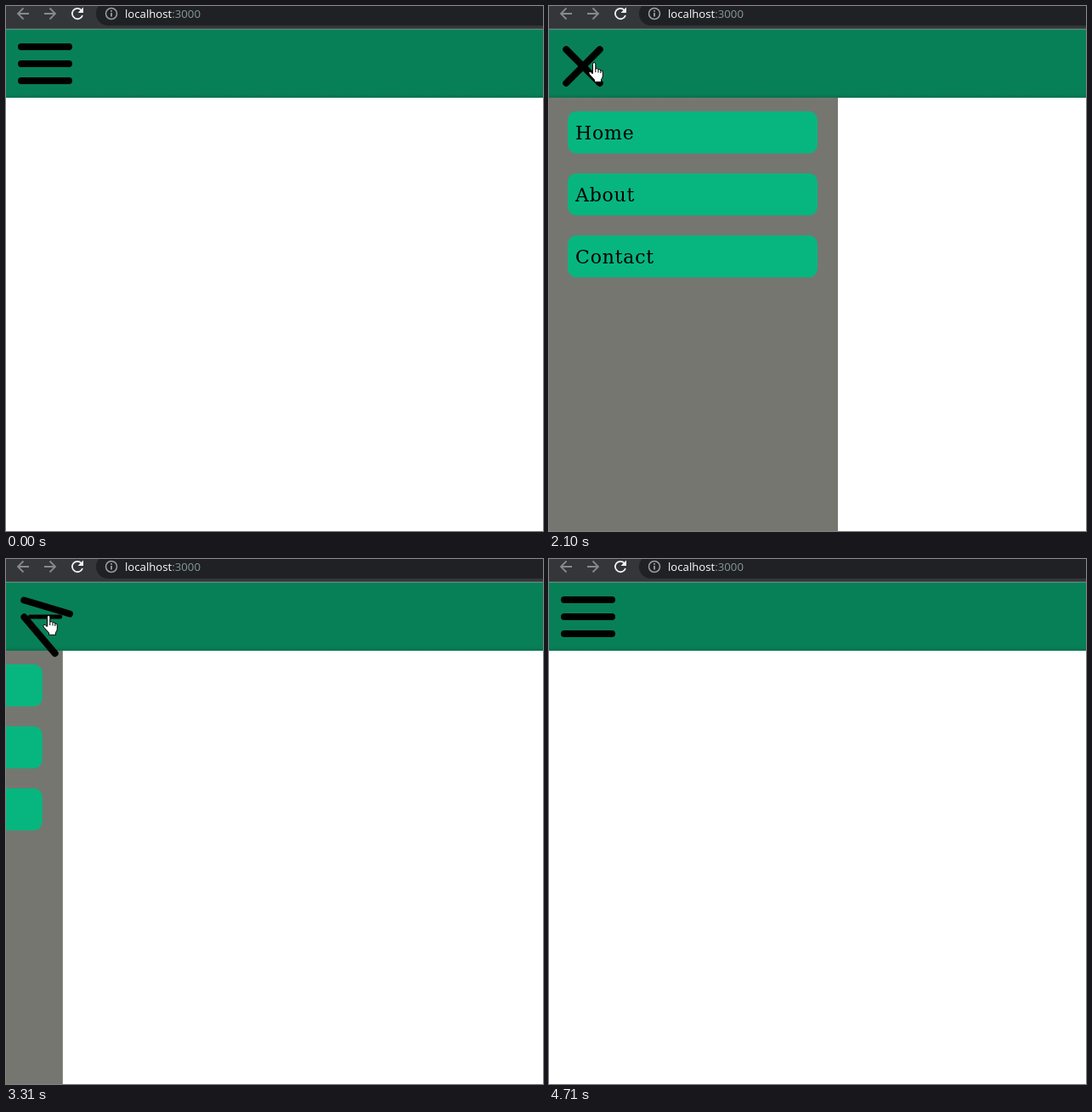
An HTML page for the animation above (6.03 s loop, 632 by 618 pixels).

```html
<!DOCTYPE html>
<html lang="en">
<head>
<meta charset="utf-8">
<title>Sliding menu</title>
<style>
  html, body { margin: 0; width: 100%; height: 100%; overflow: hidden; background: #fff; }
  svg { display: block; }
  .url { font: 13.2px "Open Sans", "Noto Sans", sans-serif; fill: #fff; }
  .link { font: 22px "DejaVu Serif", "Noto Serif", serif; letter-spacing: .8px; }
  .icon { fill: none; stroke-width: 1.8; }
  .bar { stroke: #000; stroke-width: 8; stroke-linecap: round; }
  .cursor { fill: #fff; stroke: #000; stroke-linejoin: round; }
</style>
</head>
<body>
<svg width="632" height="618" viewBox="0 0 632 618">
  <defs>
    <linearGradient id="shade" x2="0" y2="1">
      <stop stop-color="#088057"/>
      <stop offset="1" stop-color="#08714d"/>
    </linearGradient>
  </defs>

  <!-- browser toolbar -->
  <rect width="632" height="27" fill="#35363a"/>
  <rect y="26" width="632" height="1.5" fill="#4a4c50"/>
  <rect x="106" y="-5" width="560" height="28" rx="14" fill="#202124"/>
  <g class="icon" stroke="#87898c">
    <path d="M27 9H14M20.5 2.5L14 9l6.500 6.500"/>
    <path d="M45 9H58M51.500 2.500L58 9l-6.500 6.500"/>
  </g>
  <path class="icon" stroke="#f1f3f4" stroke-width="2" d="M88.500 4.600A6.200 6.200 0 1 0 90 11"/>
  <path fill="#f1f3f4" d="M91 1.500V8h-6.500z"/>
  <g class="icon" stroke="#9aa0a6">
    <circle cx="124" cy="9" r="6.500" stroke-width="1.500"/>
    <path d="M124 8v4.500M124 5v1.700"/>
  </g>
  <text class="url" x="140" y="14">localhost<tspan fill="#87999c">:3000</tspan></text>

  <!-- page -->
  <rect y="27.500" width="632" height="80.500" fill="#088057"/>
  <rect y="103" width="632" height="5" fill="url(#shade)"/>
  <g id="side">
    <rect y="108" width="340" height="510" fill="#767670"/>
  </g>
  <path id="top" class="bar" d="M-28 0H28"/>
  <path id="mid" class="bar" d="M-28 0H28"/>
  <path id="low" class="bar" d="M-28 0H28"/>

  <path id="arrow" class="cursor" d="M.5 .5V16.500L4.200 13L6.700 18.700L9.300 17.500L6.800 12H12z"/>
  <path id="hand" class="cursor" d="M5.500 13V2.300Q5.500 .5 7.100 .5T8.800 2.300V8Q11.500 6.800 12 8.800Q14.300 7.800 14.800 10Q17.300 9.300 17.300 12V16Q17.300 18.500 15.500 20.500V23.300H7.500V21L1.300 14Q.2 11.800 2 11.200Q3.300 11 5.500 14M8.800 8V12M12 8.800V12.500M14.800 10V13"/>
</svg>
<script>
const LOOP = 6030, SIDE_WIDTH = 340, SIDE_DELAY = 84;
// [start, duration, direction]
const toggles = [[1135, 500, 1], [2290, 420, -1], [3036, 500, 1], [4190, 430, -1]];
// [time, x, y] of the pointing hand
const rests = [[700, 59, 70], [1000, 58, 69], [1900, 54, 68], [2000, 49, 67],
  [2100, 46, 66], [2300, 45, 66], [2910, 43, 66]];
const $ = id => document.getElementById(id);
const place = (id, transform) => $(id).setAttribute('transform', transform);
const show = (id, on) => $(id).style.display = on ? '' : 'none';

['Home', 'About', 'Contact'].forEach((label, i) => {
  const y = 124 + 73 * i;
  $('side').insertAdjacentHTML('beforeend',
    `<rect x="22" y="${y}" width="294" height="49.5" rx="10" fill="#07b67f"/>
     <text class="link" x="31" y="${y + 33}">${label}</text>`);
});

// cubic-bezier(.42, 0, 1, 1)
function easeIn(x) {
  if (x <= 0) return 0;
  if (x >= 1) return 1;
  let lo = 0, hi = 1, s;
  for (let i = 0; i < 20; i++) {
    s = (lo + hi) / 2;
    const bx = 1.26 * s * (1 - s) ** 2 + 3 * s * s * (1 - s) + s ** 3;
    if (bx < x) lo = s; else hi = s;
  }
  return s * s * (3 - 2 * s);
}

function openness(t, delay) {
  return toggles.reduce((sum, [start, length, dir]) =>
    sum + dir * easeIn((t - start - (dir > 0 ? delay : 0)) / length), 0);
}

function drawCursor(t) {
  show('arrow', t >= 100 && t < 700);
  show('hand', t >= 700 && t < 4710);
  const u = Math.min(1, Math.max(0, (t - 100) / 600));
  place('arrow', `translate(${397 - 331 * u} ${70 + 292 * (1 - u) ** 1.33})`);
  const [, x, y] = rests.filter(r => r[0] <= t).pop() || rests[0];
  place('hand', `translate(${x} ${y})`);
}

function draw(now) {
  const time = now % LOOP, lag = time >= 2500 ? 10 : 0;
  const t = Math.floor((time - lag) / 100) * 100 + lag;
  const p = openness(t, 0), side = openness(t, SIDE_DELAY);
  place('side', `translate(${SIDE_WIDTH * (side - 1)} 0)`);
  place('top', `translate(46 48) rotate(${45 * p}) translate(${12 * p} ${20.5 * p})`);
  place('mid', `translate(46 68) scale(${1 - p})`);
  place('low', `translate(46 88) rotate(${135 * p}) translate(${-7.8 * p} ${16.3 * p})`);
  show('mid', p < .999);
  drawCursor(t);
}

const began = performance.now();
function tick() {
  draw(performance.now() - began);
  requestAnimationFrame(tick);
}
tick();
</script>
</body>
</html>
```
